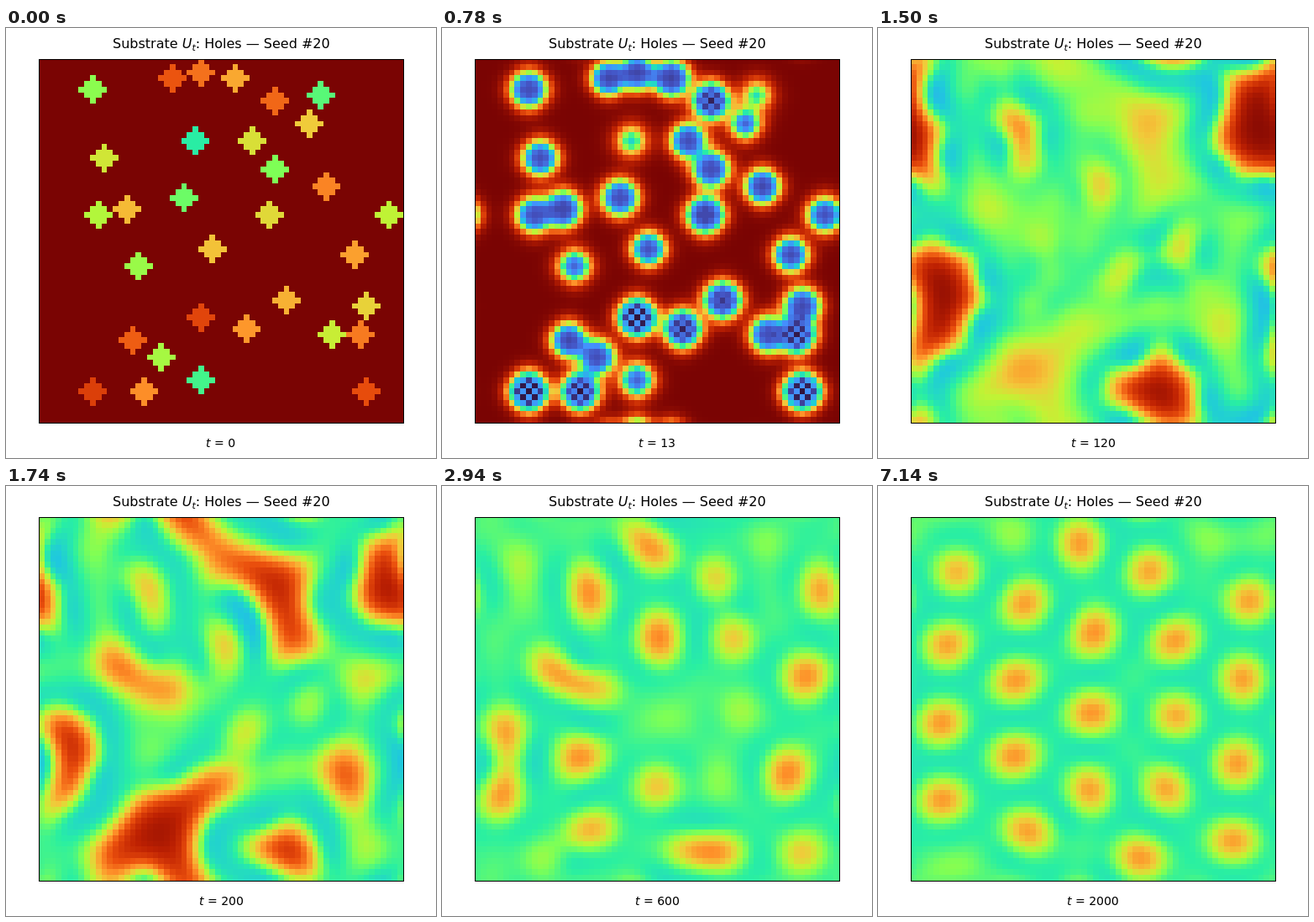
An HTML page with a canvas that plays this animation: 512x512 px, repeating every 8000 ms.

```html
<!DOCTYPE html>
<html lang="en">
<head>
<meta charset="utf-8">
<title>Substrate: Holes</title>
<style>
  html, body { margin: 0; width: 100%; height: 100%; overflow: hidden; background: #fff; }
  svg, canvas { position: absolute; left: 0; top: 0; width: 512px; height: 512px; }
  text { font-family: "DejaVu Sans", sans-serif; white-space: pre; }
  .var { font-style: italic; }
</style>
</head>
<body>
<canvas id="view" width="512" height="512"></canvas>
<svg viewBox="0 0 512 512">
  <rect x="39.5" y="37.5" width="434" height="433" fill="none" stroke="#000"/>
  <text id="title" y="24" font-size="16">Substrate <tspan class="var">U</tspan><tspan class="var" font-size="11.2" dy="2.6">t</tspan><tspan dy="-2.6">: Holes — Seed #20</tspan></text>
  <text id="label" y="499" font-size="14"><tspan class="var">t</tspan> = <tspan id="count">0</tspan></text>
</svg>
<script>
// Gray-Scott reaction on a wrapped grid
const N = 64, FEED = 0.039, KILL = 0.058, DU = 0.16, DV = 0.08;
const LOOP = 8000, STEP = 60, LAST = 119;

// column, row and activator of each seed disc, in order of rising substrate
const seeds = [
  [27, 14, .36], [28, 56, .5], [49, 6, .33], [25, 24, .72],
  [41, 19, .72], [9, 5, .7], [17, 36, .43], [21, 52, .62],
  [10, 27, .6], [61, 27, .55], [51, 48, .64], [11, 17, .56],
  [37, 14, .55], [40, 27, .8], [57, 43, .62], [47, 11, .36],
  [30, 33, .45], [15, 26, .66], [43, 42, .76], [34, 3, .68],
  [55, 34, .47], [36, 47, .78], [18, 58, .84], [50, 22, .5],
  [56, 48, .82], [28, 2, .5], [41, 7, .7], [16, 49, .47],
  [23, 3, .45], [57, 58, .86], [28, 45, .87], [9, 58, .9]
];
const seedSubstrate = i => 0.36 + 0.49 * (i / (seeds.length - 1)) ** 0.8;

const stops = "30123b 4454c4 4490fe 1fc8de 29efa2 7dff56 c1f334 f1ca3a fe922a ea4f0d be2102 7a0403"
  .split(" ").map(h => [0, 2, 4].map(i => parseInt(h.slice(i, i + 2), 16)));

function colour(x) {
  const p = Math.min(1, Math.max(0, x)) * (stops.length - 1);
  const i = Math.min(stops.length - 2, Math.floor(p));
  return stops[i].map((c, j) => c + (stops[i + 1][j] - c) * (p - i));
}

const wrap = i => (i + N) % N;

// single steps at first, then twenty at a time
const timeOf = n => n <= 20 ? n : 20 * (n - 19);

function simulate() {
  let u = new Float64Array(N * N).fill(1), v = new Float64Array(N * N);
  let u2 = u.slice(), v2 = v.slice();
  seeds.forEach(([cx, cy, activator], k) => {
    for (let y = -2; y <= 2; y++)
      for (let x = -2; x <= 2; x++)
        if (x * x + y * y <= 4) {
          const i = wrap(cy + y) * N + wrap(cx + x);
          u[i] = seedSubstrate(k);
          v[i] = activator;
        }
  });
  const advance = () => {
    for (let y = 0; y < N; y++) {
      const up = wrap(y - 1) * N, mid = y * N, down = wrap(y + 1) * N;
      for (let x = 0; x < N; x++) {
        const l = mid + wrap(x - 1), r = mid + wrap(x + 1), i = mid + x;
        const lu = u[l] + u[r] + u[up + x] + u[down + x] - 4 * u[i];
        const lv = v[l] + v[r] + v[up + x] + v[down + x] - 4 * v[i];
        const react = u[i] * v[i] * v[i];
        u2[i] = u[i] + DU * lu - react + FEED * (1 - u[i]);
        v2[i] = v[i] + DV * lv + react - (FEED + KILL) * v[i];
      }
    }
    [u, u2, v, v2] = [u2, u, v2, v];
  };
  const states = [u.slice()];
  for (let n = 1, t = 0; n <= LAST; n++) {
    for (; t < timeOf(n); t++) advance();
    states.push(u.slice());
  }
  return states;
}

const $ = id => document.getElementById(id);
const states = simulate();
const ctx = $("view").getContext("2d");
const grid = document.createElement("canvas");
grid.width = grid.height = N;
const gctx = grid.getContext("2d");
const pixels = gctx.createImageData(N, N);
ctx.imageSmoothingEnabled = false;
ctx.rect(39, 37, 434, 433);
ctx.clip();
let shown = -1;

// centre a text on a whole pixel
function centre(text) {
  text.setAttribute("x", Math.round(256 - text.getComputedTextLength() / 2));
}

function draw(n) {
  if (n === shown) return;
  shown = n;
  states[n].forEach((x, i) => pixels.data.set([...colour(x), 255], i * 4));
  gctx.putImageData(pixels, 0, 0);
  ctx.drawImage(grid, 39, 36, 434, 434);
  $("count").textContent = timeOf(n);
  centre($("label"));
}

const start = performance.now();
function tick() {
  const ms = (performance.now() - start) % LOOP;
  draw(Math.min(LAST, Math.floor(ms / STEP)));
  requestAnimationFrame(tick);
}
centre($("title"));
draw(0);
tick();
</script>
</body>
</html>
```
